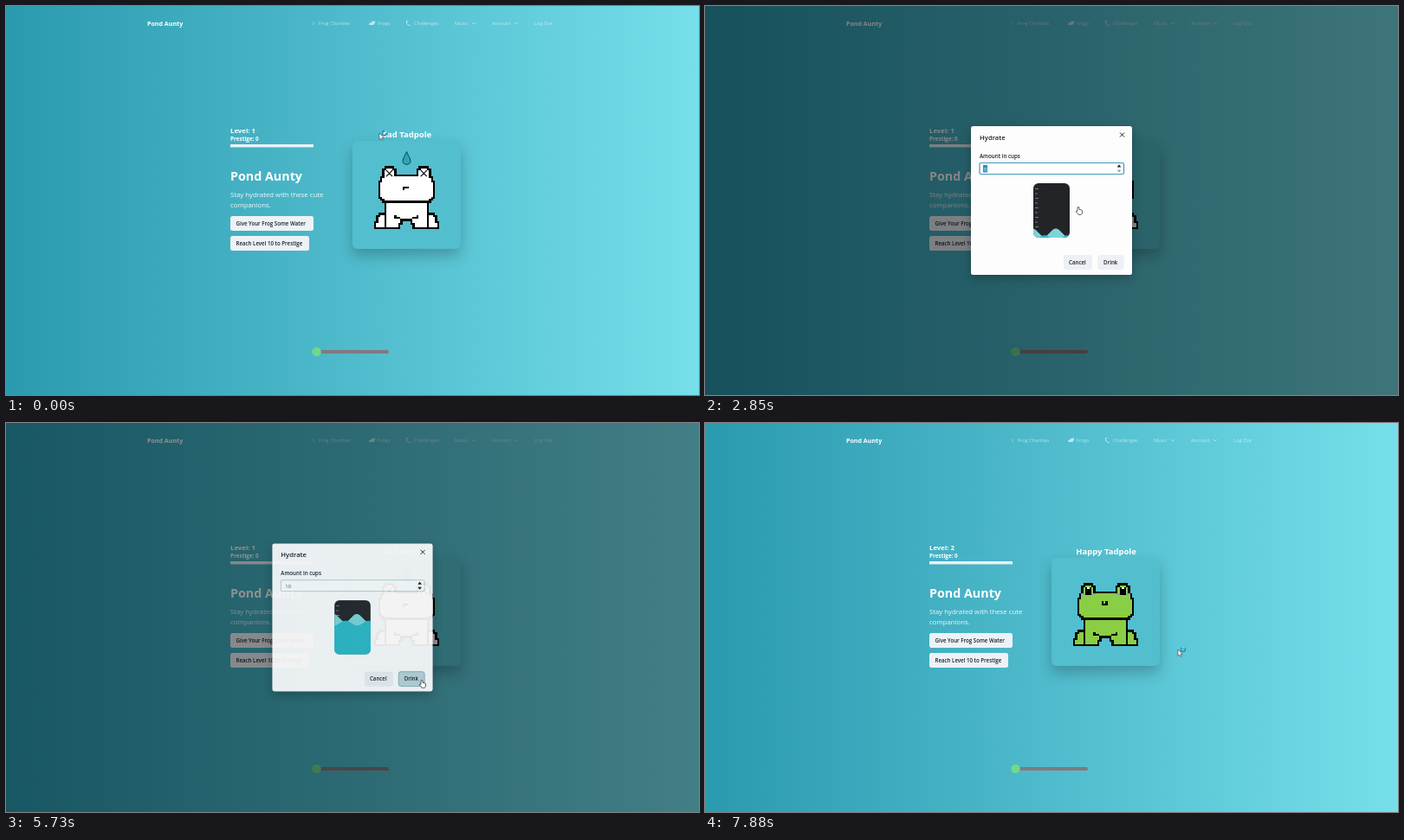
An HTML page that plays this animation: 800x450 px, repeating every 7.97 s.

```html
<!DOCTYPE html>
<html lang="en">
<head>
<meta charset="utf-8">
<title>Pond Aunty</title>
<style>
html, body { margin: 0; width: 100%; height: 100%; overflow: hidden; }
svg { display: block; width: 800px; height: 450px; font-family: "Open Sans", "Noto Sans", sans-serif; }
.b { font-weight: 700; }
.m { font-weight: 600; }
.pixel { shape-rendering: crispEdges; }
.line { fill: none; stroke: #000; stroke-width: 1; stroke-linecap: square; }
.card { filter: drop-shadow(0 8px 8px rgba(0, 0, 0, .23)); }
.sheet { filter: drop-shadow(0 4px 6px rgba(0, 0, 0, .25)); }
</style>
</head>
<body>
<svg viewBox="0 0 800 450">
  <defs>
    <linearGradient id="sky">
      <stop offset="0" stop-color="#2a9aaf"/>
      <stop offset=".5" stop-color="#4fbbcc"/>
      <stop offset="1" stop-color="#76dfeb"/>
    </linearGradient>
    <clipPath id="glass"><rect x="379" y="205" width="42" height="63" rx="6"/></clipPath>
  </defs>
  <rect width="800" height="450" fill="url(#sky)"/>

  <text class="b" x="163" y="22.7" font-size="7.1" fill="#fff">Pond Aunty</text>
  <g font-size="5.7" fill="#fff" opacity=".62">
    <text x="361" y="22">Frog Charities</text>
    <text x="429" y="22">Frogs</text>
    <text x="471" y="22">Challenges</text>
    <text x="518" y="22">Music</text>
    <text x="561" y="22">Account</text>
    <text x="610" y="22">Log Out</text>
    <rect x="354.5" y="18" width="1" height="4" opacity=".6"/>
    <path d="M419 22q0-3 3-3l1-2 1 1 2-1v3l-2 2z"/>
    <path d="M462.5 17.5v3l3 2h1.500M462.500 17.500h2" fill="none" stroke="#fff"/>
    <path d="M538 19l2 2 2-2M587 19l2 2 2-2" fill="none" stroke="#fff" stroke-width=".7"/>
  </g>

  <g fill="#fff">
    <text id="level" class="b" x="259" y="147" font-size="7.8"></text>
    <g id="gain" class="m">
      <text x="259" y="143.500" font-size="7.9" fill="#70dc8f">Leveled Up!</text>
      <text class="b" x="313" y="142" font-size="6" fill="#c1df48">+100 EXP</text>
    </g>
    <text class="b" x="259" y="155.500" font-size="6.35">Prestige: 0</text>
    <rect x="259" y="160" width="96" height="3.400" fill="#edf2f7"/>
    <text class="b" x="259" y="202" font-size="14.3">Pond Aunty</text>
    <g font-size="7.8" opacity=".93">
      <text x="259" y="220.500">Stay hydrated with these cute</text>
      <text x="259" y="233">companions.</text>
    </g>
  </g>
  <g class="m" font-size="6.15" fill="#1a202c">
    <rect id="give" x="259" y="243" width="96" height="17" rx="2.500"/>
    <rect x="259" y="266" width="91" height="17" rx="2.500" fill="#edf2f7"/>
    <text x="265.500" y="253.800">Give Your Frog Some Water</text>
    <text x="265.500" y="276.800">Reach Level 10 to Prestige</text>
  </g>

  <rect class="card" x="400" y="156" width="125" height="125" rx="6" fill="#53becd"/>
  <text id="mood" class="b" x="463" y="152.300" font-size="9.5" fill="#fff" text-anchor="middle"></text>
  <g class="pixel" transform="translate(425 185.400) scale(2.340)">
    <g id="skin" class="line">
      <path d="M5.500 23.500H2.500V24.500H1.500V27.500H.5V30.500H5.500M26.500 23.500H29.500V24.500H30.500V27.500H31.500V30.500H26.500"/>
      <path d="M5.500 17.500V30.500H12.500V28.500H13.500V26.500H18.500V28.500H19.500V30.500H26.500V17.500"/>
      <path d="M10.500 24.500V25.500H12.500M21.500 24.500V25.500H19.500"/>
      <path d="M2.500 7.500V15.500H3.500V16.500H4.500V17.500H27.500V16.500H28.500V15.500H29.500V7.500H28.500V5.500H27.500V1.500H26.500V.5H22.500V1.500H21.500V4.500H10.500V1.500H9.500V.5H5.500V1.500H4.500V5.500H3.500V7.500Z"/>
    </g>
    <g id="sad">
      <path d="M6 2l3 3M9 2l-3 3M23 2l3 3M26 2l-3 3" fill="none" stroke="#000" stroke-width=".5" shape-rendering="auto"/>
      <path d="M14 10h3v1h-2v1h-1z"/>
    </g>
    <g id="happy">
      <path d="M6 2h3v4H6zM23 2h3v4h-3zM14 9h1v1h1v-1h1v2h-3z"/>
      <path d="M7 2h1v1H7zM24 2h1v1h-1z" fill="#fff"/>
      <path d="M4 5h2v1H4zM9 5h2v1H9zM21 5h2v1h-2zM26 5h2v1h-2z" fill="#96a096"/>
    </g>
  </g>
  <path id="drop" d="M462.500 168.500C461 173 458 176 458 179.500C458 184.500 467 184.500 467 179.500C467 176 464 173 462.500 168.500Z" fill="#2aa6b8" stroke="#14424c"/>

  <rect x="358" y="398" width="84" height="4" rx="2" fill="#82797f"/>
  <circle cx="358.500" cy="400" r="5.300" fill="#6fd88c"/>

  <rect id="shade" width="800" height="450"/>
  <g id="modal" class="m" fill="#1a202c">
    <rect class="sheet" x="307" y="139" width="186" height="172" rx="2.500" fill="#fdfdfe"/>
    <text x="317" y="155" font-size="7.7">Hydrate</text>
    <path d="M479 146.500l5 5M484 146.500l-5 5" stroke="#1a202c" stroke-width="1"/>
    <text x="317" y="175.500" font-size="6.2">Amount in cups</text>
    <rect id="field" x="317" y="181.500" width="166.500" height="13" rx="1.500" fill="#fff"/>
    <rect id="pick" x="321" y="184" width="5" height="8.500" fill="#2f8fc4"/>
    <text id="cups" x="322" y="190.500" font-size="6" font-weight="400"></text>
    <rect id="caret" x="326" y="184.500" width=".6" height="7.500"/>
    <path d="M475.700 186.500h4.600l-2.300-3.300z"/>
    <path id="less" d="M475.700 189.500h4.600l-2.300 3.300z"/>
    <g clip-path="url(#glass)">
      <rect x="379" y="205" width="42" height="63" fill="#232428"/>
      <path d="M381 211.500h4m-4 5.500h3m-3 5.500h4m-4 5.500h3m-3 5.500h4m-4 5.500h3m-3 5.500h4m-4 5.500h3m-3 5.500h4" stroke="#a9b4b8" stroke-width=".6"/>
      <path id="back" fill="#7fd3da"/>
      <path id="front" fill="#2bb8c8"/>
    </g>
    <rect x="414" y="288" width="33" height="17" rx="2.500" fill="#edf0f4"/>
    <rect id="drink" x="453.500" y="288" width="30" height="17" rx="2.500"/>
    <g font-size="6.2">
      <text x="420" y="298.700">Cancel</text>
      <text x="460" y="298.700">Drink</text>
    </g>
  </g>

  <g id="cursor">
    <g id="arrow">
      <path d="M0 0v7.500l1.800-1.600 1.300 2.600 1.200-.6-1.300-2.500h2.200z" fill="#fff" stroke="#222" stroke-width=".5"/>
      <circle cx="6" cy="0" r="2.500" fill="none" stroke="#2389b5" stroke-width="1.300"/>
      <path id="spin" d="M6-2.500A2.500 2.500 0 0 1 8.500 0" fill="none" stroke="#7fd9ee" stroke-width="1.300"/>
    </g>
    <path id="hand" d="M0 1Q1-.5 2 1V3.500Q5.500 3.500 5.500 5V7Q5 9 4.500 9.300H1Q0 7.500-1.700 6Q-1.800 4.500 0 5.300Z" fill="#fff" stroke="#222" stroke-width=".7"/>
  </g>
</svg>
<script>
const LOOP = 7970;
const el = Object.fromEntries([...document.querySelectorAll("[id]")].map(e => [e.id, e]));
const set = (e, attrs) => { for (const k in attrs) e.setAttribute(k, attrs[k]); };
const show = (e, on) => set(e, { opacity: +on });
const ease = p => p * p * (3 - 2 * p);
const ramp = (t, from, to) => ease(Math.min(1, Math.max(0, (t - from) / (to - from))));
const within = (t, from, to) => t >= from && t < to;

// time, x, y of the pointer tip
const route = [
  [0, 431, 147], [750, 310, 249], [1620, 318, 252], [1760, 402, 266], [2350, 430, 232],
  [3250, 430, 232], [3900, 283, 177], [4400, 283, 177], [5350, 479, 297], [5800, 479, 297],
  [6360, 519, 245], [7450, 519, 245], [7880, 546, 262], [LOOP, 546, 262]
];

function pointer(t) {
  const i = route.findIndex(k => k[0] > t);
  const [t0, x0, y0] = route[i - 1], [t1, x1, y1] = route[i];
  const p = ramp(t, t0, t1);
  return `translate(${x0 + (x1 - x0) * p} ${y0 + (y1 - y0) * p})`;
}

function wave(base, amp, crest) {
  let d = "M379 268";
  for (let x = 379; x <= 421; x++) d += `L${x} ${base - amp * Math.cos((x - crest) / 27 * 2 * Math.PI)}`;
  return d + "L421 268Z";
}

function draw(t) {
  // page
  const happy = t >= 5940, leveled = within(t, 5980, 7560);
  el.level.textContent = t < 5980 ? "Level: 1" : "Level: 2";
  show(el.level, !leveled);
  set(el.gain, { opacity: ramp(t, 5980, 6150) * (1 - ramp(t, 7450, 7560)) });
  el.mood.textContent = happy ? "Happy Tadpole" : "Sad Tadpole";
  el.skin.style.fill = happy ? "#8ace45" : "#fff";
  show(el.happy, happy);
  show(el.sad, !happy);
  show(el.drop, !happy);
  set(el.give, { fill: within(t, 680, 1900) ? "#d9dce2" : "#edf2f7" });

  // dialog
  const open = ramp(t, 1790, 2000) * (1 - ramp(t, 5690, 5910));
  const size = .95 + .05 * open;
  set(el.shade, { opacity: .48 * open });
  set(el.modal, { opacity: open, transform: `translate(400 225) scale(${size}) translate(-400 -225)` });
  const text = t < 3450 ? "0" : t < 4500 ? "1" : "10";
  el.cups.textContent = text;
  set(el.cups, { fill: text === "0" ? "#fff" : "#4a5568" });
  show(el.pick, text === "0");
  set(el.less, { fill: text === "0" ? "#9aa1aa" : "#1a202c" });
  set(el.caret, { x: text === "1" ? 325.5 : 329.5, opacity: +within(t, 3450, 5450) });
  set(el.field, within(t, 0, 5450) ? { stroke: "#4299b8", "stroke-width": 1.2 } : { stroke: "#a5c6ce", "stroke-width": .8 });
  const level = 262 - 21.5 * ramp(t, 3450, 4150) - 15 * ramp(t, 4500, 5200);
  set(el.back, { d: wave(level, 4.6, 405) });
  set(el.front, { d: wave(level + 6, 2.8, 392) });
  const hot = within(t, 5250, 5950);
  set(el.drink, { fill: hot ? "#b9d3da" : "#edf0f4", stroke: hot ? "#86b3bf" : "none" });

  // pointer
  const hand = within(t, 680, 3400) || within(t, 5250, 5900);
  set(el.cursor, { transform: pointer(t) });
  show(el.hand, hand);
  show(el.arrow, !hand);
  set(el.spin, { transform: `rotate(${t * .36} 6 0)` });
}

const start = performance.now();
(function tick() {
  draw((performance.now() - start) % LOOP);
  requestAnimationFrame(tick);
})();
</script>
</body>
</html>
```
